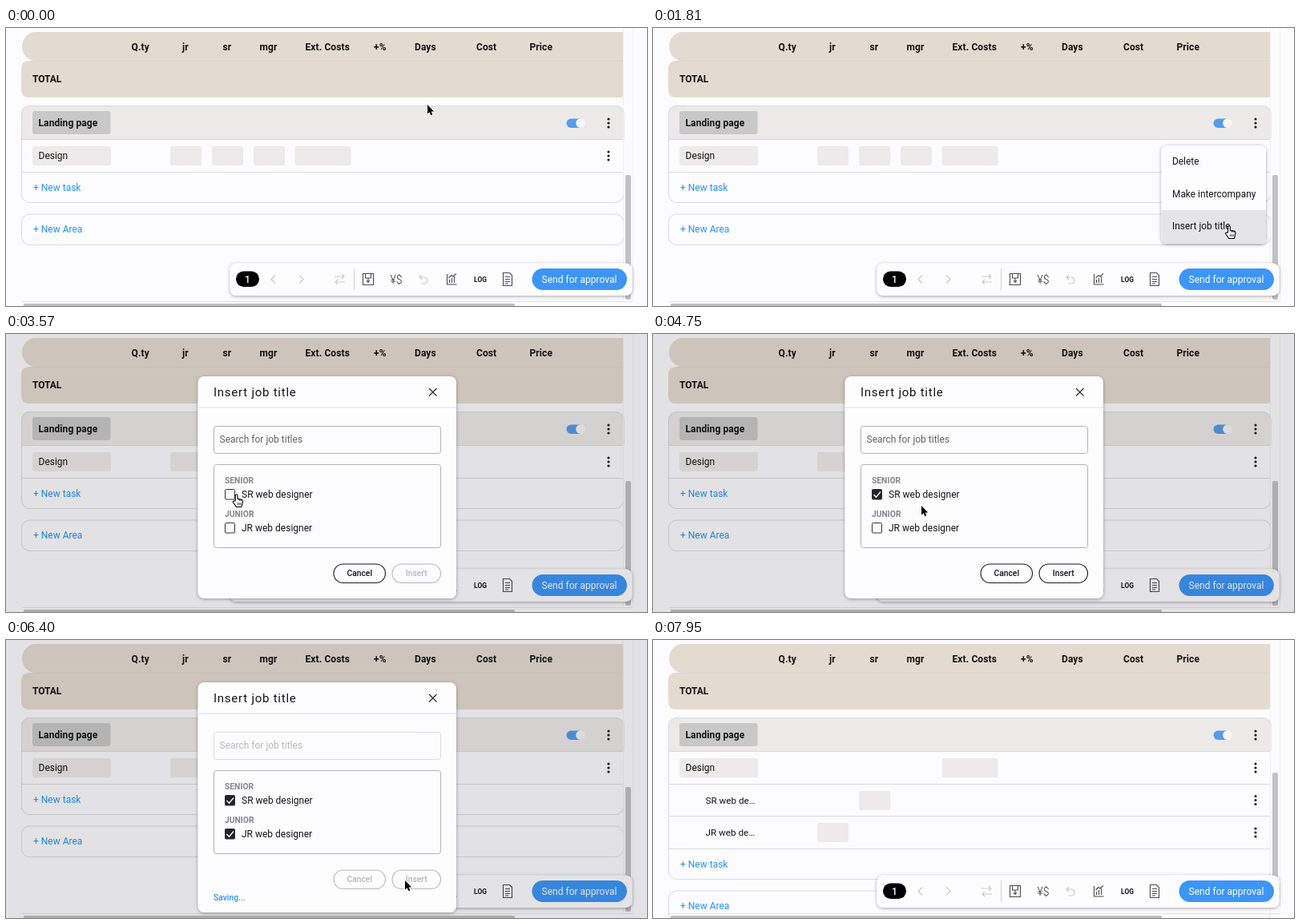
Animation, 800 px wide and 348 px high, one loop 8 s. Source, as an HTML page:

```html
<!DOCTYPE html>
<html lang="en">
<head>
<meta charset="utf-8">
<title>Insert job title</title>
<style>
html, body { margin: 0; width: 100%; height: 100%; overflow: hidden; background: #fcfbfe; }
svg { display: block; width: 100vw; height: 100vh; }
text { font-family: Roboto, "Open Sans", sans-serif; font-size: 12px; fill: #141414; white-space: pre; }
.b { font-weight: 600; }
.m { font-weight: 500; }
.blue { fill: #2b91f3; }
.line { fill: none; stroke: #dad9dc; }
.icon { fill: none; stroke: #4a4a4c; stroke-width: 1.1; }
.pale { fill: none; stroke: #c9c8cb; stroke-width: 1.2; }
.cell { fill: #ecebea; }
.small { font-size: 10.3px; font-weight: 500; }
</style>
</head>
<body>
<svg id="stage" viewBox="0 0 800 348" preserveAspectRatio="none">
  <defs>
    <filter id="soft" x="-10%" y="-30%" width="120%" height="160%">
      <feDropShadow dx="0" dy="1" stdDeviation="2" flood-color="#000" flood-opacity=".35"/>
    </filter>
    <clipPath id="cardClip"><rect id="clipBox" x="19" y="97" width="753" height="122" rx="10"/></clipPath>
  </defs>
  <rect width="800" height="348" fill="#fcfbfe"/>
  <g id="head"></g>
  <g id="card" clip-path="url(#cardClip)"></g>
  <rect id="cardEdge" class="line" x="19.5" y="97.5" width="751" height="121" rx="10"/>
  <g id="addArea">
    <rect class="line" x="19.5" y="233" width="751" height="38.5" rx="10"/>
    <text class="blue" x="34" y="256">+ New Area</text>
  </g>
  <path d="M20 342.5H782" stroke="#e3e2e5"/>
  <path d="M770.5 0V342M782.5 0V342" stroke="#f1f0f3"/>
  <rect id="thumb" x="773" y="184" width="7" height="156" rx="2" fill="#c2c1c3"/>
  <rect x="22" y="345" width="613" height="4" rx="1.5" fill="#c0bfc1"/>
  <g id="bar"></g>
  <g id="menu"></g>
  <rect id="shade" width="800" height="348"/>
  <g id="modal"></g>
  <g id="cursor">
    <path id="arrow" d="M0 0V11.6L2.6 9.3 4.3 13.2 6.3 12.3 4.6 8.5H8.2Z" fill="#000" stroke="#fff" stroke-width="1.4" paint-order="stroke" stroke-linejoin="round"/>
    <g id="hand" stroke="#000" stroke-width="1.1" stroke-linejoin="round">
      <path d="M-1.4 8V1.2a1.4 1.4 0 0 1 2.8 0V5.4l5 1q1.7.5 1.5 2.3L7.2 12.4 6.2 15.5H-.2L-4.2 9.8q-.6-1.7 1-1.7Z" fill="#fff"/>
      <path d="M3.6 5.9V8M5.8 6.5V8.4M1.5 10.3V13M3.4 10.3V13M5.3 10.3V13" stroke-width=".8"/>
    </g>
  </g>
</svg>
<script>
const LOOP = 8000;
const $ = id => document.getElementById(id);
const text = (x, y, s, cls = '', extra = '') => `<text x="${x}" y="${y}" class="${cls}" ${extra}>${s}</text>`;
const box = (x, y, w, h, r, attrs) => `<rect x="${x}" y="${y}" width="${w}" height="${h}" rx="${r}" ${attrs}/>`;
const path = (d, cls = 'icon', extra = '') => `<path d="${d}" class="${cls}" ${extra}/>`;
const cell = (x, y, w) => box(x, y, w, 24, 3, 'class="cell"');
const dots = y => [-5, 0, 5].map(d => `<circle cx="752" cy="${y + d}" r="1.6" fill="#1c1c1c"/>`).join('');
const rule = y => path(`M20 ${y}.5H771`, 'line');

// Table header
const columns = [['Q.ty', 156.5], ['jr', 220], ['sr', 270.5], ['mgr', 316.5], ['Ext. Costs', 373.5],
  ['+%', 459], ['Days', 510], ['Cost', 587], ['Price', 653.5]];
$('head').innerHTML =
  path('M771 5H37A17 18 0 0 0 37 41H771Z', '', 'fill="#e4dbd0"') +
  path('M771 41H29Q19 41 19 51V77Q19 87 29 87H766Q771 87 771 82Z', '', 'fill="#e4dbd0"') +
  path('M30 41.5H771', '', 'stroke="#ddd4c9"') +
  columns.map(([s, x]) => text(x, 28, s, 'b', 'letter-spacing=".1"')).join('') +
  text(33, 68, 'TOTAL', 'b');

// Area card
$('card').innerHTML =
  box(19, 97, 753, 42, 0, 'fill="#ebeae9"') +
  box(33, 104, 97.5, 29, 3, 'fill="#c9c8c8"') +
  text(40.5, 122.5, 'Landing page', 'b', 'letter-spacing=".1"') +
  box(699.5, 113.5, 21, 11.5, 5.7, 'fill="#579ce9"') +
  '<circle cx="717" cy="119.2" r="5.8" fill="#f6f5f5"/>' +
  dots(119) + rule(139) +
  cell(33, 148, 98) + text(40.5, 164, 'Design') + cell(360.5, 148, 70) + dots(160) + rule(180) +
  '<g id="empty">' + [205, 257, 309].map(x => cell(x, 148, 39)).join('') + '</g>' +
  '<g id="people">' +
  text(65.5, 204.5, 'SR web de…', '', 'style="font-size:11.7px"') + cell(257, 189, 39) + dots(200.5) + rule(220) +
  text(65.5, 245, 'JR web de…', '', 'style="font-size:11.7px"') + cell(205, 229, 39) + dots(241) + rule(261) +
  '</g>' +
  `<g id="addTask">${text(34, 203.5, '+ New task', 'blue')}</g>`;

// Floating toolbar
$('bar').innerHTML =
  box(279.5, 294.5, 502, 40.5, 8, 'fill="#fdfcfe" filter="url(#soft)"') +
  box(287, 304.5, 29, 19.5, 9.7, 'fill="#000"') +
  text(301.5, 318.5, '1', 'm', 'text-anchor="middle" style="fill:#fff"') +
  path('M336 309.5L331 314.5 336 319.5M366 309.5L371 314.5 366 319.5', 'pale') +
  path('M410 311H422M419 308L422 311 419 314M423 318H411M414 315L411 318 414 321', 'pale') +
  path('M434.5 301V328', 'line', 'style="stroke:#cfced1"') +
  path('M445.5 307.5H458.5V321.5H445.5ZM448.5 307.5V313H455.5V307.5M452 313V318M450 316L452 318.3 454 316') +
  '<circle id="coin" cx="487" cy="314.5" r="13.7" fill="#000"/>' +
  text(487, 319.5, '¥$', '', 'id="money" text-anchor="middle" style="font-size:14px;font-weight:300"') +
  path('M519 309L516 312 519 315M516 312H522Q526 312.5 526 316.3T521 320H518', 'pale') +
  path('M550.5 308V321H562.5M553.5 319V315M556.5 319V313M559.5 319V311M552.5 313L556 309.5 558 311 562 307.5') +
  text(592, 318, 'LOG', 'b', 'text-anchor="middle" style="font-size:8.4px"') +
  path('M620.5 306.5H628.5L631.5 309.5V322.5H620.5ZM623 311.5H629M623 314.5H629M623 317.5H629M623 320H627') +
  box(656.5, 301, 118.5, 27, 13.5, 'fill="#3d95f6"') +
  text(715.5, 318.5, 'Send for approval', '', 'text-anchor="middle" style="fill:#fff"');

// Row menu
$('menu').innerHTML =
  box(634.5, 147, 130.5, 123, 7, 'fill="#fdfcfe" filter="url(#soft)"') +
  '<path id="hover" fill="#e5e4e6"/>' +
  ['Delete', 'Make intercompany', 'Insert job title'].map((s, i) => text(648, 171 + i * 40.5, s, '', 'style="font-size:11.9px"')).join('');

// Dialog
const option = (id, y, label) =>
  box(273.5, y - 6.5, 12, 12.5, 1, `id="${id}Box" stroke="#333"`) +
  path(`M275.5 ${y}L278.5 ${y + 3.2} 284 ${y - 3.5}`, '', `id="${id}Tick" fill="none" stroke="#fff" stroke-width="1.3"`) +
  text(294, y + 4.3, label);
const pill = (id, x, w, label) => `<g id="${id}">` +
  box(x, 288, w, 23.5, 11.7, 'fill="#fdfcfe" stroke="#1a1a1a" stroke-width="1.1"') +
  text(x + w / 2, 303.3, label, 'small', 'text-anchor="middle"') + '</g>';
$('modal').innerHTML =
  box(239.5, 53, 322.5, 278, 8, 'id="sheet" fill="#fdfcfe" filter="url(#soft)"') +
  text(259, 77.8, 'Insert job title', '', 'style="font-size:15px;letter-spacing:.75px"') +
  path('M528 68L537.5 77.5M537.5 68L528 77.5', 'icon', 'style="stroke:#222"') +
  path('M240 92H562', 'line', 'style="stroke:#dddce0"') +
  '<g id="search">' + box(259.5, 115.5, 283, 34, 3, 'fill="none" stroke="#b3b2b4"') +
  text(266.5, 136, 'Search for job titles', '', 'style="fill:#626164"') + '</g>' +
  box(259.5, 163.5, 283, 104, 3, 'fill="none" stroke="#b3b2b4"') +
  text(273, 187, 'SENIOR', 'b', 'style="font-size:10.3px;fill:#858487"') +
  option('sr', 201, 'SR web designer') +
  text(273, 229, 'JUNIOR', 'b', 'style="font-size:10.3px;fill:#858487"') +
  option('jr', 243, 'JR web designer') +
  pill('cancel', 409, 64.5, 'Cancel') + pill('insert', 482, 60.5, 'Insert') +
  text(259, 326.3, 'Saving...', 'small blue', 'id="saving"');

// Pointer stops: time, x, y
const stops = [[0, 526, 96], [250, 526, 96], [900, 750, 115], [1200, 750, 115], [1650, 719, 248],
  [2700, 719, 248], [3650, 279, 200], [4350, 279, 200], [4750, 335, 215], [5250, 279, 242],
  [5550, 279, 242], [6150, 498, 301], [6900, 498, 301], [7200, 492, 366], [LOOP, 492, 366]];
const clamp = v => Math.max(0, Math.min(1, v));
const span = (t, a, b) => clamp((t - a) / (b - a));
const ease = p => p < .5 ? 4 * p ** 3 : 1 - (2 - 2 * p) ** 3 / 2;
const smooth = p => p * p * (3 - 2 * p);

function pointer(t) {
  const i = stops.findIndex(s => s[0] > t);
  const [t0, x0, y0] = stops[i - 1], [t1, x1, y1] = stops[i];
  const p = smooth(span(t, t0, t1));
  return [x0 + (x1 - x0) * p, y0 + (y1 - y0) * p];
}

const show = (id, on) => $(id).setAttribute('visibility', on ? 'inherit' : 'hidden');
const set = (id, name, value) => $(id).setAttribute(name, value);
const inside = (x, y, l, t, r, b) => x >= l && x <= r && y >= t && y <= b;

function update(t) {
  const [x, y] = pointer(t);
  const menuOpen = t >= 1060 && t < 2180;
  const fade = span(t, 2180, 2350) * (1 - span(t, 6480, 6630));
  const modalOpen = t >= 2180 && t < 6630;
  const saving = t >= 6380;
  const srOn = t >= 4000, jrOn = t >= 5400;

  // Card grows once the roles are saved
  const added = t >= 6480;
  const grow = 81 * ease(span(t, 6480, 6880));
  set('clipBox', 'height', 122 + grow);
  set('cardEdge', 'height', 121 + grow);
  set('addArea', 'transform', `translate(0 ${grow})`);
  set('addTask', 'transform', `translate(0 ${added ? 81 : 0})`);
  set('thumb', 'y', 184 - 18 * grow / 81);
  set('thumb', 'height', 156 - 18 * grow / 81);
  show('people', added);
  show('empty', !added);

  const overCoin = !modalOpen && Math.hypot(x - 487, y - 314.5) < 20;
  show('coin', overCoin);
  $('money').style.fill = overCoin ? '#fff' : '#2a2a2a';

  show('menu', menuOpen);
  const inMenu = menuOpen && inside(x, y, 634, 147, 765, 270);
  const item = Math.min(2, Math.floor((y - 147) / 40.5));
  const top = 147 + item * 40.5;
  set('hover', 'd', !inMenu ? '' : item === 2
    ? `M634.5 ${top}H765V263Q765 270 758 270H641.5Q634.5 270 634.5 263Z`
    : item === 0
      ? 'M634.5 187.5V154Q634.5 147 641.5 147H758Q765 147 765 154V187.5Z'
      : `M634.5 ${top}H765V${top + 40.5}H634.5Z`);

  set('shade', 'opacity', .1 * fade);
  show('modal', modalOpen);
  set('modal', 'opacity', fade);
  set('sheet', 'height', saving ? 288 : 278);
  show('saving', saving && modalOpen);
  for (const [id, on] of [['sr', srOn], ['jr', jrOn]]) {
    set(id + 'Box', 'fill', on ? '#242325' : '#fdfcfe');
    show(id + 'Tick', on && modalOpen);
  }
  set('search', 'opacity', saving ? .45 : 1);
  set('cancel', 'opacity', saving ? .3 : 1);
  set('insert', 'opacity', saving || !srOn ? .3 : 1);

  const overOption = modalOpen && (inside(x, y, 272, 193, 384, 208) || inside(x, y, 272, 235, 384, 250));
  const overInsert = modalOpen && srOn && !saving && inside(x, y, 482, 288, 543, 312);
  const overDots = !modalOpen && inside(x, y, 742, 108, 762, 130);
  const hand = inMenu || overOption || overInsert || overDots || overCoin;
  show('hand', hand);
  show('arrow', !hand);
  set('cursor', 'transform', `translate(${x.toFixed(2)} ${y.toFixed(2)})`);
}

const start = performance.now();
function tick(now) {
  update(Math.max(0, now - start) % LOOP);
  requestAnimationFrame(tick);
}
update(0);
requestAnimationFrame(tick);
</script>
</body>
</html>
```
